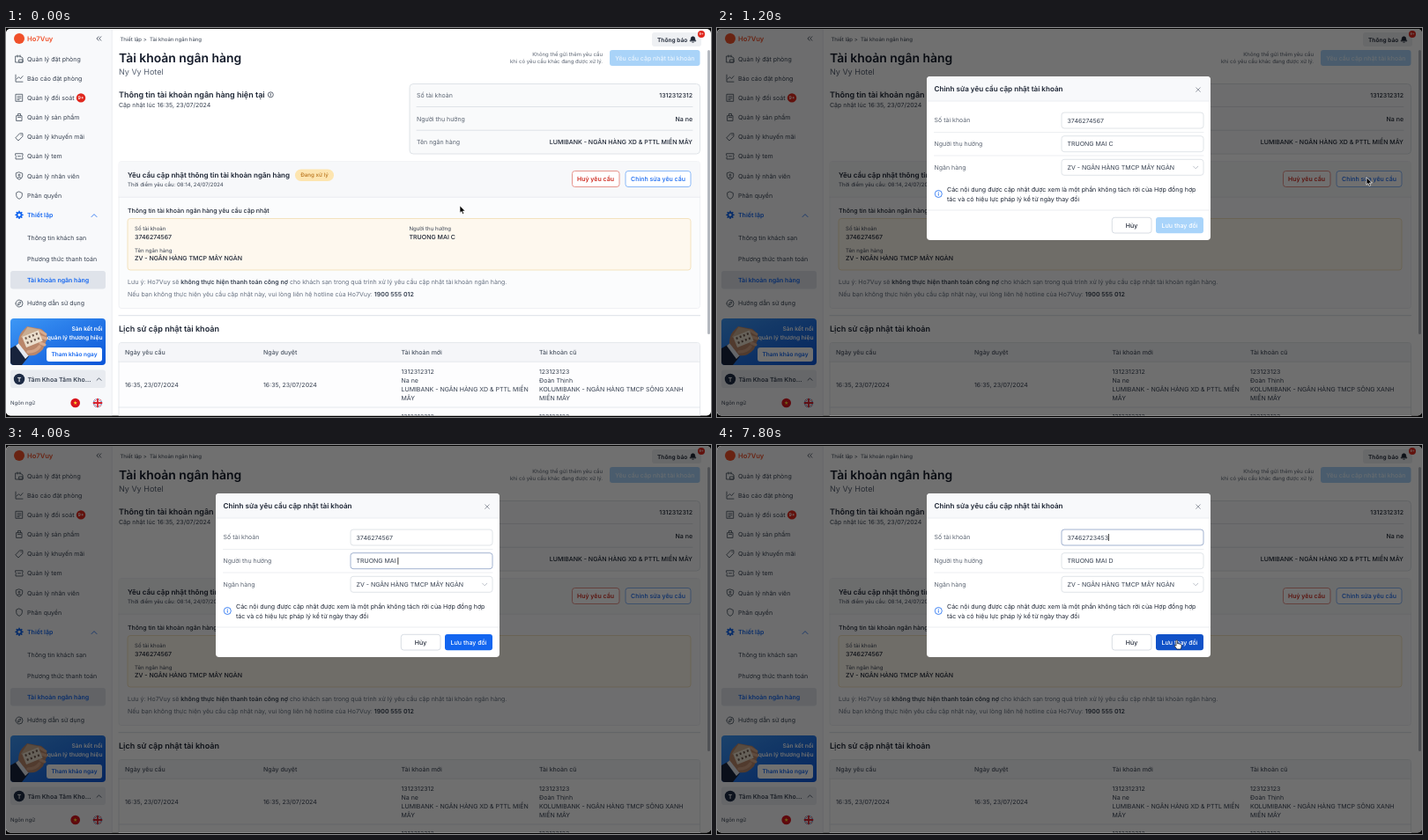
An HTML page that plays this animation: 800 by 442 pixels, repeating every 8 s.

```html
<!DOCTYPE html>
<html lang="vi">
<head>
<meta charset="utf-8">
<title>Tài khoản ngân hàng</title>
<style>
html, body { margin: 0; width: 100%; height: 100%; overflow: hidden; background: #000; }
svg { display: block; width: 100%; height: 100%; font-family: Inter, sans-serif; text-rendering: geometricPrecision; }
text { white-space: pre; }
</style>
</head>
<body>
<svg id="stage" viewBox="0 0 800 442"></svg>
<script>
const LOOP = 8000, TICK = 100;
const INK = '#1c2433', TEXT = '#374151', MUTED = '#5b6472', BLUE = '#1366f0', RED = '#e0281e', LINE = '#d9dde3';

const BRAND = 'Ho7Vuy';
const BANK_NOW = 'LUMIBANK - NGÂN HÀNG XD & PTTL MIỀN MÂY';
const BANK_NEW = 'ZV - NGÂN HÀNG TMCP MÂY NGÀN';
const ACCOUNT = '3746274567', OWNER = 'TRUONG MAI C';

// Drawing helpers
const esc = s => s.replace(/&/g, '&amp;').replace(/>/g, '&gt;');
const text = (x, y, s, { size = 7, w = 400, fill = TEXT, at = 'start', id = '' } = {}) =>
  `<text ${id && `id="${id}"`} x="${x}" y="${y}" font-size="${size}" font-weight="${w}" fill="${fill}" text-anchor="${at}">${esc(s)}</text>`;
const rich = (x, y, parts) =>
  `<text x="${x}" y="${y}" font-size="7" fill="#667080">${parts.map((s, i) =>
    i % 2 ? `<tspan font-weight="600" fill="${TEXT}">${s}</tspan>` : s).join('')}</text>`;
const box = (x1, y1, x2, y2, fill, { r = 3, stroke = 'none', sw = .8, id = '' } = {}) =>
  `<rect ${id && `id="${id}"`} x="${x1}" y="${y1}" width="${x2 - x1}" height="${y2 - y1}" rx="${r}" fill="${fill}" stroke="${stroke}" stroke-width="${sw}"/>`;
const path = (d, stroke, sw = .8, fill = 'none') =>
  `<path d="${d}" fill="${fill}" stroke="${stroke}" stroke-width="${sw}" stroke-linecap="round" stroke-linejoin="round"/>`;
const shape = (d, fill) => path(d, 'none', 0, fill);
const disc = (x, y, r, fill, stroke = 'none') =>
  `<circle cx="${x}" cy="${y}" r="${r}" fill="${fill}" stroke="${stroke}" stroke-width=".8"/>`;
const rule = (x1, x2, y, c = LINE, sw = .8) => path(`M${x1} ${y}H${x2}`, c, sw);
const info = (x, y, r, c) => disc(x, y, r, 'none', c) + path(`M${x} ${y - r * .15}v${r * .6}M${x} ${y - r * .48}v.05`, c, .8);

// Icons live in a 9 x 9 box centred on the origin
const ICONS = {
  book: 'M-4 -3h5l3 2v5h-8zM-2 -4v2M1 -4v2M0 1h4v3h-4z',
  chart: 'M-4 -4v8h8M-3 1l2.5 -2.5l2 2l2.5 -3',
  check: 'M-3.7 -4h7.4v8h-7.4zM-2 -1.5h4M-2 .5h4M-2 2.3h2',
  bag: 'M-3 -1.8h6v5.8h-6zM-1.5 -2v-2h3v2M-1.5 0h3',
  tag: 'M-4 1l4.5 -4.8h3.4v3.4l-4.6 4.6zM2 -2v.1',
  ticket: 'M-4 -3h8v2.2a1 1 0 0 0 0 1.8v2.2h-8v-2.2a1 1 0 0 0 0 -1.8zM-1.5 0h3',
  shield: 'M0 -4l3.7 1.3v2.7q0 3 -3.7 4.3q-3.7 -1.3 -3.7 -4.3v-2.7zM-1 -.8a1 1 0 1 0 2 0a1 1 0 1 0 -2 0M-2 2.3q2 -2 4 0',
  key: 'M0 -4l3.3 1.5v3q0 2.4 -3.3 3.8q-3.3 -1.4 -3.3 -3.8v-3z',
  guide: 'M-4 0a4 4 0 1 0 8 0a4 4 0 1 0 -8 0M-1.7 1.7l1 -2.6l2.5 -1l-1 2.6z'
};
const icon = (name, y) => `<g transform="translate(15 ${y})">${path(ICONS[name], '#4b5563', .85)}</g>`;

function gear(x, y) {
  let teeth = '';
  for (let i = 0; i < 8; i++) {
    const a = i * Math.PI / 4, c = Math.cos(a), s = Math.sin(a);
    teeth += `M${x + 3 * c} ${y + 3 * s}L${x + 3.9 * c} ${y + 3.9 * s}`;
  }
  return path(teeth, BLUE, 1.7) + `<circle cx="${x}" cy="${y}" r="2.5" fill="none" stroke="${BLUE}" stroke-width="1.7"/>`;
}

function star(x, y, r) {
  const pts = [...Array(10)].map((_, i) => {
    const a = -Math.PI / 2 + i * Math.PI / 5, k = i % 2 ? r * .4 : r;
    return `${x + k * Math.cos(a)},${y + k * Math.sin(a)}`;
  });
  return `<polygon points="${pts.join(' ')}" fill="#ffdf2e"/>`;
}

function flags() {
  return disc(78.7, 426, 5.3, '#d9151e') + star(78.7, 426, 2.3) +
    `<g clip-path="url(#round)">${disc(104, 426, 5.3, '#23408f')}` +
    path('M98 420l12 12M110 420l-12 12', '#fff', 2) + path('M98 420l12 12M110 420l-12 12', '#d8232e', .7) +
    path('M104 420v12M98 426h12', '#fff', 3.2) + path('M104 420v12M98 426h12', '#d8232e', 1.8) + '</g>';
}

// A hand holding a small model house
function photo() {
  return shape('M5 364l9 -5l12 14l-8 10h-13z', '#17233c') + shape('M11 361l5 -4l11 14l-5 5z', '#e4e8ef') +
    shape('M14 358q0 -8 4 -13l6 -6l16 3q6 4 7 10l-5 13q-8 9 -17 7z', '#b9866a') +
    path('M38 344l7 4M40 351l6 2M39 358l5 2', '#d8ab8e', 3) +
    '<g transform="rotate(-22 29 351)">' + box(19, 346, 39, 360, '#eaddcb', { r: 0 }) + shape('M17 347l12 -8l12 8z', '#c9ad92') +
    '<path d="M21.5 350h16M21.5 355.5h16" stroke="#6d594d" stroke-width="2.4" stroke-dasharray="2 2.4"/></g>' +
    path('M25 368q9 0 13 -6', '#d2a284', 3.4);
}

function banner() {
  return `<g clip-path="url(#card)">${box(5, 330, 113, 383, 'url(#sky)', { r: 0 })}${photo()}</g>` +
    text(109.5, 343.6, 'Sàn kết nối', { size: 6.6, w: 600, fill: '#fff', at: 'end' }) +
    text(109.5, 354.2, 'quản lý thương hiệu', { size: 6.6, w: 600, fill: '#fff', at: 'end' }) +
    box(46, 363, 109, 379, '#fff') +
    text(77.5, 373.4, 'Tham khảo ngay', { size: 6.5, w: 600, fill: BLUE, at: 'middle' });
}

function sidebar() {
  const menu = [['book', 'Quản lý đặt phòng'], ['chart', 'Báo cáo đặt phòng'], ['check', 'Quản lý đối soát'],
    ['bag', 'Quản lý sản phẩm'], ['tag', 'Quản lý khuyến mãi'], ['ticket', 'Quản lý tem'],
    ['shield', 'Quản lý nhân viên'], ['key', 'Phân quyền']];
  return box(0, 1, 120, 440.5, '#f8f9fb', { r: 0 }) + path('M120.3 2V440', '#e4e7ec', .7) +
    disc(15, 12, 6, '#f0502a') + text(24, 14.8, BRAND, { size: 7.6, w: 600, fill: '#f0502a' }) +
    path('M105 9.8l-2.1 2.2l2.1 2.2M107.8 9.8l-2.1 2.2l2.1 2.2', TEXT) +
    menu.map(([k, s], i) => icon(k, 35 + i * 22.15) + text(24, 37.6 + i * 22.15, s)).join('') +
    disc(85, 79.4, 5.2, RED) + text(85, 81.3, '9+', { size: 5.2, w: 600, fill: '#fff', at: 'middle' }) +
    gear(15, 212.3) + text(24, 214.6, 'Thiết lập', { w: 600, fill: BLUE }) + path('M97 214.6l3 -3l3 3', BLUE) +
    text(24, 240.6, 'Thông tin khách sạn') + text(24, 264.8, 'Phương thức thanh toán') +
    box(5, 276, 113, 296.5, '#dfe3ea') + text(24, 289, 'Tài khoản ngân hàng', { w: 600, fill: BLUE }) +
    icon('guide', 313) + text(24, 315.3, 'Hướng dẫn sử dụng') + banner() +
    box(5, 388.5, 113, 409, '#e8ebf0') + disc(15, 399, 6.2, '#1d2b45') +
    text(15, 401.5, 'T', { w: 600, fill: '#fff', at: 'middle' }) +
    text(24.5, 401.6, 'Tâm Khoa Tâm Kho...', { w: 600 }) + path('M103 400.3l2.5 -2.5l2.5 2.5', TEXT) +
    text(5, 428.4, 'Ngôn ngữ', { size: 6 }) + flags();
}

function header() {
  return text(129.5, 15.3, 'Thiết lập >', { size: 6 }) + text(163, 15.3, 'Tài khoản ngân hàng', { size: 6 }) +
    box(733, 5, 789, 21, '#eef0f3') + text(739, 15.5, 'Thông báo', { size: 6.6, w: 600, fill: INK }) +
    path('M776.3 14.6q1 -1 1 -2.5q0 -2.3 2.2 -2.3t2.2 2.3q0 1.5 1 2.5zM778.8 16.2h1.4', INK, .8, INK) +
    disc(789, 7, 4, RED) + text(789, 8.4, '9+', { size: 3.8, w: 600, fill: '#fff', at: 'middle' }) +
    text(128, 38.8, 'Tài khoản ngân hàng', { size: 13.9, w: 600, fill: '#141b2a' }) +
    text(128, 53, 'Ny Vy Hotel', { size: 9, fill: '#566070' }) +
    text(677, 32.2, 'Không thể gửi thêm yêu cầu', { size: 6, fill: MUTED, at: 'end' }) +
    text(677, 40.2, 'khi có yêu cầu khác đang được xử lý.', { size: 6, fill: MUTED, at: 'end' }) +
    box(685, 25, 787.5, 43, '#a9d3f8') +
    text(736.3, 36.5, 'Yêu cầu cập nhật tài khoản', { w: 500, fill: '#e9f4fe', at: 'middle' });
}

function current() {
  const rows = [['Số tài khoản', '1312312312'], ['Người thụ hưởng', 'Na ne'], ['Tên ngân hàng', BANK_NOW]];
  return text(128, 79, 'Thông tin tài khoản ngân hàng hiện tại', { size: 9, w: 600, fill: INK }) + info(300.3, 75.8, 3, TEXT) +
    text(128, 90.4, 'Cập nhật lúc 16:35, 23/07/2024') +
    box(458, 63.5, 787.5, 143, '#f9fafb', { r: 4, stroke: LINE }) +
    rows.map(([k, v], i) => text(466, 78.8 + i * 26.7, k, { fill: MUTED }) +
      text(779, 78.8 + i * 26.7, v, { w: 500, fill: INK, at: 'end' }) +
      (i ? rule(466, 779, 62.8 + i * 26.7) : '')).join('');
}

function pending() {
  const small = { size: 6.05, fill: TEXT }, value = { w: 500, fill: INK };
  return box(128, 151.5, 787.5, 318.5, '#fbfcfd', { r: 3, stroke: '#eceef2' }) +
    box(128, 151.5, 787.5, 192, '#f7f8fa') + rule(128, 787.5, 192.2, '#e6e9ee') +
    text(138, 169.8, 'Yêu cầu cập nhật thông tin tài khoản ngân hàng', { size: 8.05, w: 600, fill: INK }) +
    box(328, 160.5, 372, 174, '#fde5b0', { r: 6.7 }) +
    text(350, 169.4, 'Đang xử lý', { size: 6.2, w: 500, fill: '#b9741c', at: 'middle' }) +
    text(138, 180.4, 'Thời điểm yêu cầu: 08:14, 24/07/2024', { size: 6.04 }) +
    box(642.5, 162.5, 696, 180.5, '#fff', { stroke: '#e07a70' }) +
    text(669, 174, 'Huỷ yêu cầu', { w: 600, fill: '#cf2b20', at: 'middle' }) +
    box(703, 162.5, 777, 180.5, '#fff', { stroke: '#6fa8f7' }) +
    text(740, 174, 'Chỉnh sửa yêu cầu', { w: 500, fill: BLUE, at: 'middle' }) +
    text(138, 209.5, 'Thông tin tài khoản ngân hàng yêu cầu cập nhật', { w: 500, fill: INK }) +
    box(138, 216.5, 777, 275, '#fef8ee', { stroke: '#f2dcb2' }) +
    text(146, 230.3, 'Số tài khoản', small) + text(146, 240, ACCOUNT, value) +
    text(457.5, 230.3, 'Người thụ hưởng', small) + text(457.5, 240, OWNER, value) +
    text(146, 254.5, 'Tên ngân hàng', small) + text(146, 264.2, BANK_NEW, value) +
    rich(138, 290.6, [`Lưu ý: ${BRAND} sẽ `, 'không thực hiện thanh toán công nợ',
      ' cho khách sạn trong quá trình xử lý yêu cầu cập nhật tài khoản ngân hàng.']) +
    rich(138, 305, [`Nếu bạn không thực hiện yêu cầu cập nhật này, vui lòng liên hệ hotline của ${BRAND}: `, '1900 555 012']);
}

function history() {
  const cols = [135, 292, 448.5, 605];
  const heads = ['Ngày yêu cầu', 'Ngày duyệt', 'Tài khoản mới', 'Tài khoản cũ'];
  const now = ['1312312312', 'Na ne', 'LUMIBANK - NGÂN HÀNG XD & PTTL MIỀN', 'MÂY'];
  const old = ['123123123', 'Đoàn Thịnh', 'KOLUMIBANK - NGÂN HÀNG TMCP SÔNG XANH', 'MIỀN MÂY'];
  const lines = (x, list) => list.map((s, i) => text(x, 392.9 + i * 10, s)).join('');
  return rule(128, 787.5, 326.7, '#e3e6eb', 1.2) +
    text(128, 345, 'Lịch sử cập nhật tài khoản', { size: 9.05, w: 600, fill: INK }) +
    box(128, 357.5, 787.5, 460, '#fdfdfe', { stroke: '#dfe3e8' }) + box(128.4, 358, 787, 379, '#f5f6f9') +
    rule(128, 787.5, 379.2, '#dfe3e8') +
    heads.map((s, i) => text(cols[i], 371.1, s, { w: 500, fill: '#4b5563' })).join('') +
    text(135, 407.6, '16:35, 23/07/2024') + text(292, 407.6, '16:35, 23/07/2024') +
    lines(448.5, now) + lines(605, old) + rule(128, 787.5, 431, '#dfe3e8') +
    text(448.5, 444, now[0]) + text(605, 444, old[0]);
}

function modal() {
  const field = (y, id) => box(391, y, 552, y + 18, '#fff', { stroke: LINE, id });
  const label = (y, s) => text(246.5, y, s, { fill: MUTED });
  return box(238, 55, 560, 241, '#fff', { r: 4, id: 'sheet' }) +
    shape('M238 83V59q0 -4 4 -4H556q4 0 4 4V83z', '#f8f9fb') + rule(238.4, 559.6, 83, '#e6e9ee') +
    text(246.5, 71.8, 'Chỉnh sửa yêu cầu cập nhật tài khoản', { size: 8.1, w: 600, fill: INK }) +
    path('M543.7 67.8l4.6 4.6M548.3 67.8l-4.6 4.6', '#6b7280', .7) +
    '<g id="form">' +
    label(107.4, 'Số tài khoản') + field(96, 'accBox') + text(397.5, 107.5, ACCOUNT, { id: 'acc' }) +
    rule(246.5, 552, 118.5, '#e9ebef') +
    label(134.2, 'Người thụ hưởng') + field(122.7, 'ownBox') + text(397.5, 134.3, OWNER, { id: 'own' }) +
    rule(246.5, 552, 145, '#e9ebef') +
    label(160.8, 'Ngân hàng') + field(149.3, 'bank') + text(397.5, 160.9, BANK_NEW) +
    path('M540.6 157.2l2.6 2.6l2.6 -2.6', '#a3aab5', .7) + '</g>' +
    info(251.3, 188.5, 4, BLUE) +
    text(261, 186, 'Các nội dung được cập nhật được xem là một phần không tách rời của Hợp đồng hợp', { size: 7.05, fill: INK }) +
    text(261, 196.6, 'tác và có hiệu lực pháp lý kể từ ngày thay đổi', { size: 7.05, fill: INK }) +
    rule(238.4, 559.6, 207, '#e6e9ee') +
    box(448.3, 215.3, 493, 233, '#fff', { stroke: '#cfd5de' }) +
    text(470.6, 226.7, 'Hủy', { w: 500, fill: INK, at: 'middle' }) +
    box(498, 215, 552, 233.3, BLUE, { id: 'save' }) +
    text(525, 226.7, 'Lưu thay đổi', { w: 500, fill: '#fff', at: 'middle' }) +
    '<path id="caret" stroke="#111" stroke-width=".8"/>';
}

const stage = document.getElementById('stage');
stage.innerHTML = `<defs>
  <clipPath id="page"><rect y="1" width="800" height="439.5" rx="5"/></clipPath>
  <clipPath id="card"><rect x="5" y="330" width="108" height="53" rx="4"/></clipPath>
  <clipPath id="round"><circle cx="104" cy="426" r="5.3"/></clipPath>
  <linearGradient id="sky" x2="1" y2="1"><stop stop-color="#3d97f5"/><stop offset="1" stop-color="#0b55d8"/></linearGradient>
  </defs>
  <rect width="800" height="442"/>
  <g clip-path="url(#page)">${box(0, 0, 800, 442, '#fff', { r: 0 })}${sidebar()}${header()}${current()}${pending()}${history()}
  ${box(796, 25, 799, 348, '#b4b8bf', { r: 1.5 })}
  <rect id="mask" width="800" height="442"/></g>
  <g id="modal">${modal()}</g>
  <g id="pointer">
  <g id="arrow">${path('M0 0v8.2l1.9 -1.7l1.3 3l1.5 -.7l-1.3 -2.8h2.6z', '#fff', .7, '#000')}</g>
  <g id="beam">${path('M-1.6 -4.2q1.6 0 1.6 1v6.4q0 1 1.6 1M1.6 -4.2q-1.6 0 -1.6 1v6.4q0 1 -1.6 1', '#333', .8)}</g>
  <g id="hand">${path('M-.7 .6q0 -1 .8 -1t.8 1v3q2.2 0 4 1q1 .6 .7 2.4l-.8 3h-4.4l-2.6 -3.6q-.4 -1.2 .9 -1l.6 .5z', '#111', .7, '#fff')}</g>
  </g>`;
const el = Object.fromEntries([...stage.querySelectorAll('[id]')].map(n => [n.id, n]));

// Timeline
const OWNER_EDITS = [[0, OWNER], [3800, OWNER.slice(0, -1)], [4400, OWNER.slice(0, -1) + 'D']];
const ACCOUNT_EDITS = [[0, ACCOUNT], [5900, '374627'], [6000, '3746272'], [6100, '37462723'],
  [6300, '374627234'], [6500, '3746272345'], [6600, '37462723453']];
const TRAVEL = [[0, 515, 202], [900, 737, 170], [1800, 737, 170], [2000, 568, 132], [2700, 482, 133],
  [3200, 470, 132], [4800, 470, 132], [5300, 462, 106], [6800, 462, 106], [7600, 521.5, 222]];
const FOCUS_OWNER = 3200, FOCUS_ACCOUNT = 5300;

const latest = (list, t) => list.filter(e => e[0] <= t).pop();
const show = (node, on) => node.setAttribute('visibility', on ? 'visible' : 'hidden');

function pointerAt(t) {
  const i = TRAVEL.findIndex(k => k[0] > t);
  if (i < 0) return TRAVEL[TRAVEL.length - 1].slice(1);
  const [a, b] = [TRAVEL[i - 1], TRAVEL[i]];
  const u = (t - a[0]) / (b[0] - a[0]), e = u * u * (3 - 2 * u);
  return [a[1] + (b[1] - a[1]) * e, a[2] + (b[2] - a[2]) * e];
}

function draw(t) {
  const open = t >= 1000, opening = open && t < 1100;
  el.mask.setAttribute('opacity', open ? (opening ? .5 : .56) : 0);
  el.modal.setAttribute('opacity', open ? (opening ? .8 : 1) : 0);
  el.modal.setAttribute('transform', `translate(0 ${opening ? -2.7 : 0})`);
  el.form.setAttribute('opacity', opening ? .5 : 1);

  const own = latest(OWNER_EDITS, t), acc = latest(ACCOUNT_EDITS, t);
  el.own.textContent = own[1];
  el.acc.textContent = acc[1];

  const onAcc = t >= FOCUS_ACCOUNT, onOwn = t >= FOCUS_OWNER && !onAcc;
  el.accBox.setAttribute('stroke', onAcc ? '#8b9fc4' : LINE);
  el.ownBox.setAttribute('stroke', onOwn ? '#8b9fc4' : LINE);
  const node = onAcc ? el.acc : el.own;
  const since = onAcc ? Math.max(FOCUS_ACCOUNT, acc[0]) : Math.max(FOCUS_OWNER, own[0]);
  const cx = 397.8 + node.getComputedTextLength(), cy = onAcc ? 105 : 131.8;
  el.caret.setAttribute('d', `M${cx} ${cy - 4}v8`);
  show(el.caret, (onAcc || onOwn) && Math.floor((t - since) / 500) % 2 === 0);

  const [x, y] = pointerAt(t);
  const inside = (x1, y1, x2, y2) => x > x1 && x < x2 && y > y1 && y < y2;
  const edited = t >= 3800;
  const overSave = edited && inside(498, 215, 552, 233);
  const overField = open && (inside(391, 96, 552, 114) || inside(391, 122.7, 552, 140.7));
  el.save.setAttribute('fill', overSave ? '#1152c8' : edited || opening ? BLUE : '#a9d4fa');

  const typing = (t >= 3800 && t < 4800) || (t >= 5900 && t < 6800);
  el.pointer.setAttribute('transform', `translate(${x} ${y})`);
  show(el.arrow, !typing && !overSave && !overField);
  show(el.beam, !typing && overField);
  show(el.hand, !typing && overSave);
}

function frame() {
  draw(Math.floor(performance.now() % LOOP / TICK) * TICK);
  requestAnimationFrame(frame);
}
frame();
</script>
</body>
</html>
```
